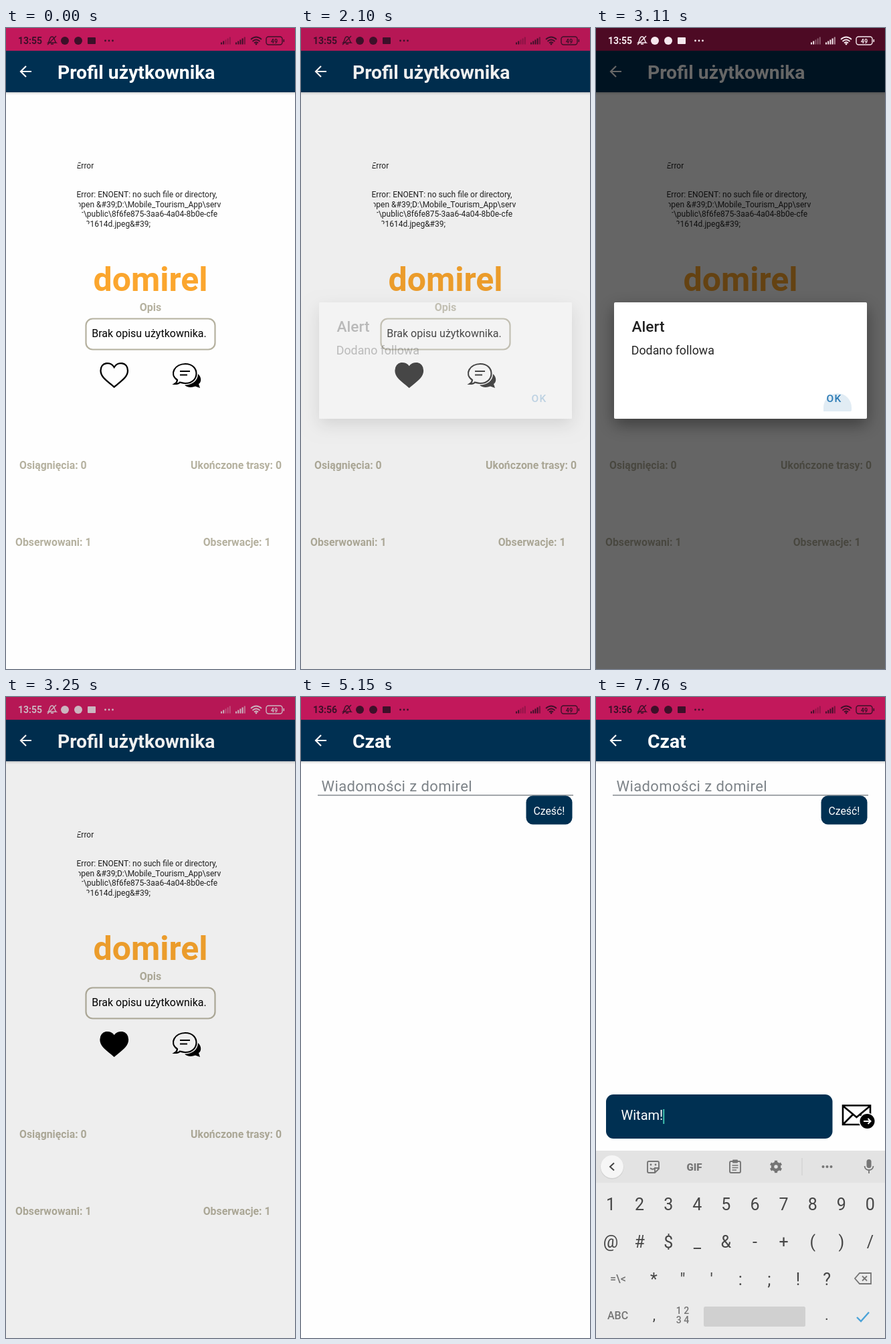
Animation of 432x958 px, one loop 8000 ms. Source, as an HTML page with a canvas:

```html
<!DOCTYPE html>
<html lang="pl">
<head>
<meta charset="utf-8">
<title>Profil i czat</title>
<style>
html, body { margin: 0; width: 100%; height: 100%; overflow: hidden; background: #fff; }
canvas { display: block; width: 432px; height: 958px; }
</style>
</head>
<body>
<canvas id="stage"></canvas>
<script>
const W = 432, H = 958, LOOP = 8000, KEYBOARD = 280;
const NAVY = '#003052', PINK = '#c2185b', ORANGE = '#fba62e', BEIGE = '#b5b19f', GREY = '#757575', KEY = '#464646';
const USER = 'domirel';

const canvas = document.getElementById('stage'), c = canvas.getContext('2d');
const dpr = window.devicePixelRatio || 1;
canvas.width = W * dpr;
canvas.height = H * dpr;

const ramp = (t, from, to) => Math.min(1, Math.max(0, (t - from) / (to - from)));
const mix = (a, b, k) => `rgb(${a.map((v, i) => Math.round(v + (b[i] - v) * k))})`;

function text(s, x, y, size, color, weight = 400, align = 'left', spacing = 0) {
  c.font = `${weight} ${size}px Roboto, sans-serif`;
  c.letterSpacing = spacing + 'px';
  c.textAlign = align;
  c.fillStyle = color;
  c.fillText(s, x, y);
}
const center = (s, x, y, size, color, weight) => text(s, x, y, size, color, weight, 'center');

function rect(x, y, w, h, color, r = 0) {
  c.fillStyle = color;
  c.beginPath();
  c.roundRect(x, y, w, h, r);
  c.fill();
}
function frame(x, y, w, h, color, r, line) {
  c.strokeStyle = color;
  c.lineWidth = line;
  c.beginPath();
  c.roundRect(x, y, w, h, r);
  c.stroke();
}
function disc(x, y, r, color) {
  c.fillStyle = color;
  c.beginPath();
  c.arc(x, y, r, 0, 7);
  c.fill();
}
function ring(x, y, r, color, line) {
  c.strokeStyle = color;
  c.lineWidth = line;
  c.beginPath();
  c.arc(x, y, r, 0, 7);
  c.stroke();
}
const fill = (d, color) => { c.fillStyle = color; c.fill(new Path2D(d)); };
function stroke(d, color, line = 2) {
  c.strokeStyle = color;
  c.lineWidth = line;
  c.stroke(new Path2D(d));
}
function layer(draw) {
  c.save();
  draw();
  c.restore();
}

function statusIcons(t) {
  const light = ramp(t, 2150, 2350) - ramp(t, 3200, 3420);
  const ink = mix([61, 16, 41], [246, 232, 238], light);
  text(t < 4000 ? '13:55' : '13:56', 18, 24, 14, ink, 700);
  stroke('M63 22C66 20 64 13 69 13C73 13 72 20 75 22ZM67 24H71M62 25L75 12', ink, 1.4);
  disc(88, 19, 6, ink);
  disc(108, 19, 6, ink);
  rect(122, 14, 12, 10, ink, 1);
  for (let i = 0; i < 3; i++) disc(148.5 + i * 5.5, 19, 1.4, ink);
  for (let i = 0; i < 5; i++) {
    const h = 3 + i * 2;
    c.globalAlpha = i < 2 ? 1 : 0.35;
    rect(321 + i * 3.2, 24.5 - h, 2, h, ink);
    c.globalAlpha = i < 4 ? 1 : 0.6;
    rect(343 + i * 3.2, 24.5 - h, 2, h, ink);
  }
  c.globalAlpha = 1;
  stroke('M366 17Q374 10 382 17M368.500 20Q374 15 379.500 20M371 22.500Q374 20 377 22.500', ink, 1.7);
  disc(374, 24, 1.4, ink);
  frame(389, 13, 24, 12, ink, 3.5, 1.4);
  rect(414.5, 17, 1.6, 4, ink);
  center('49', 401, 22.5, 9, ink, 700);
}

function header(title) {
  const g = c.createLinearGradient(0, 96, 0, 100);
  g.addColorStop(0, 'rgba(0,0,0,.16)');
  g.addColorStop(1, 'rgba(0,0,0,0)');
  rect(0, 96, W, 4, g);
  rect(0, 34, W, 62, NAVY);
  stroke('M38 65H22M30 57L22 65L30 73', '#fff', 2.2);
  text(title, 77, 75.5, 28.3, '#fff', 700);
}

function avatarError() {
  c.beginPath();
  c.arc(216, 231, 112, 0, 7);
  c.clip();
  const lines = ['Error: ENOENT: no such file or directory,', 'open &#39;D:\\Mobile_Tourism_App\\serv',
    'er\\public\\8f6fe875-3aa6-4a04-8b0e-cfe', 'a021614d.jpeg&#39;'];
  text('Error', 105.5, 210, 12, '#222');
  lines.forEach((s, i) => text(s, 105.5, 253 + i * 14.7, 12, '#222'));
}

function profile(t) {
  rect(0, 34, W, H, '#fefefe');
  header('Profil użytkownika');
  layer(avatarError);
  center(USER, 216, 393, 50, ORANGE, 700);
  center('Opis', 216, 423, 16, BEIGE, 700);
  frame(119.5, 434.5, 193, 46, BEIGE, 10, 2.2);
  text('Brak opisu użytkownika.', 128.2, 461.5, 16, '#000');

  const heart = 'M161.700 536.500C149 526 141.500 521 141.500 512C141.500 499 156.500 498 161.700 507C167 498 182 499 182 512C182 521 174.500 526 161.700 536.500Z';
  if (t >= 1960) fill(heart, '#000');
  stroke(heart, '#000', 2.3);

  stroke('M256 526C243 517 253 502 268 502C290 502 290 531 268 531C264 531 262 530 260 529.500C258 532 255 532 252 532C255 530 256 528 256 526ZM260 513H275M260 518.500H271', '#000', 2.2);
  fill('M287 517C293 522 292 530 288 532L290 538L283 535.500C277 538 270 537 267 533.500C278 534 287 527 287 517Z', '#000');

  text('Osiągnięcia: 0', 20, 658.5, 15.8, BEIGE, 700);
  text('Ukończone trasy: 0', 412, 658.5, 15.8, BEIGE, 700, 'right');
  text('Obserwowani: 1', 14, 773.5, 15.8, BEIGE, 700);
  text('Obserwacje: 1', 395.5, 773.5, 15.8, BEIGE, 700, 'right');
}

// The shadow stays outside the panel so that it does not show through while fading.
function panelShadow() {
  c.clip(new Path2D(`M0 0H${W}V${H}H0ZM27 410H405V584H27Z`), 'evenodd');
  c.shadowColor = 'rgba(0,0,0,.4)';
  c.shadowBlur = 24 * dpr;
  c.shadowOffsetY = 9 * dpr;
  rect(27, 410, 378, 174, '#fff', 2);
}

function alertBox(t, alpha) {
  c.globalAlpha = alpha;
  layer(panelShadow);
  rect(27, 410, 378, 174, '#fff', 2);
  text('Alert', 53.5, 454, 22.6, '#212121', 500);
  text('Dodano followa', 52.8, 488, 17.8, '#262626');
  if (t >= 3110) fill('M340 573V567A21 21 0 0 1 382 567V571Q382 573 380 573Z', '#e1ecf4');
  text('OK', 344.5, 559, 15.5, '#2a7ab5', 500, 'left', 1.4);
}

function chat(t) {
  rect(0, 34, W, H, '#fefefe');
  header('Czat');
  text('Wiadomości z ' + USER, 30.5, 141, 22, '#7d8388', 400, 'left', 0.4);
  rect(25, 146, 382, 1.6, '#858b90');
  if (t >= 4620) {
    rect(336.5, 147.5, 69, 43, NAVY, 10);
    text('Cześć!', 347.5, 176, 15.8, '#fff');
  }
  if (t < 5080 || t >= 5200) layer(() => composer(t));
}

// Typed text: [time, text, suggestions]
const TYPING = [
  [5300, '', ''],
  [5820, 'W', 'W We Wszystko'],
  [6030, 'Wi', 'Wi Więc Więcej'],
  [6240, 'Wit', 'Wit Witam Witaj'],
  [6400, 'Wita', 'Wita Witam Witaj'],
  [6560, 'Witam', 'Witam Witamy Witaj'],
  [7490, 'Witam!', '']
];
const typed = t => TYPING.findLast(k => t >= k[0]) || TYPING[0];

function composer(t) {
  if (t < 5080) c.translate(0, KEYBOARD);
  rect(15, 594, 338.5, 66, NAVY, 11);
  const [since, word, hints] = typed(t);
  text(word, 37.5, 632, 20, '#fff');
  const w = c.measureText(word).width;
  if (hints) rect(38, 634.5, w - 1, 1.2, '#dfe6ec');
  if (t >= 5300 && (t - since) % 1000 < 600) rect(37.5 + w, 616, 2, 22, '#3fc1b0');

  stroke('M369 610.500H410V639H369ZM369 611L389.500 628L410 611M369 639L384 624M410 639L395 624', '#000', 2.6);
  disc(405.5, 634, 12.5, '#fefefe');
  disc(405.5, 634, 11, '#000');
  stroke('M400 634H410.500M406.500 630L410.500 634L406.500 638', '#fff', 2);
}

const row = (keys, x, y, size = 25) => [...keys].forEach((k, i) => center(k, x + i * 43.1, y, size, KEY));

function suggestionBar(hints) {
  rect(0, 678, W, 48, '#e3e3e3');
  disc(24, 703, 17.5, '#d2d2d2');
  disc(24, 702, 17, '#f6f6f6');
  stroke(hints ? 'M21 696.500L27 702L21 707.500' : 'M27 696.500L21 702L27 707.500', '#444');
  rect(404.5, 691, 7, 13, GREY, 3.5);
  stroke('M401.500 701C402 709 414 709 414.500 701M408 707V712', GREY, 1.8);
  if (hints) {
    hints.split(' ').forEach((s, i) => center(s, 100 + i * 114.5, 710, 19.8, '#555'));
    rect(154, 688, 1, 27, '#cdcdcd');
    rect(275, 688, 1, 27, '#cdcdcd');
    return;
  }
  stroke('M79 694H92Q94 694 94 696V705L88 711H79Q77 711 77 709V696Q77 694 79 694ZM94 704H88V711M81 704Q85 708 89 703', GREY, 1.9);
  disc(82, 699, 1.4, GREY);
  disc(89, 699, 1.4, GREY);
  center('GIF', 147, 707.5, 15, GREY, 900);
  frame(200, 694, 16, 17, GREY, 2, 1.9);
  rect(204, 691.5, 8, 5, GREY, 1);
  stroke('M203.500 700H212.500M203.500 703.500H212.500M203.500 707H210', GREY, 1.4);
  ring(269, 702, 5, GREY, 4.5);
  for (let i = 0; i < 6; i++) {
    const a = i * Math.PI / 3 + Math.PI / 6, x = Math.cos(a), y = Math.sin(a);
    stroke(`M${269 + x * 6} ${702 + y * 6}L${269 + x * 9.2} ${702 + y * 9.2}`, GREY, 4.2);
  }
  rect(307.5, 689, 1, 26, '#cdcdcd');
  for (let i = -1; i < 2; i++) disc(345.5 + i * 6, 702, 2, GREY);
}

function keyboard(t) {
  c.translate(0, KEYBOARD * (1 - ramp(t, 5190, 5430)) ** 2);
  rect(0, 678, W, KEYBOARD, '#ebebeb');
  const [, word, hints] = typed(t);
  suggestionBar(hints);

  const symbols = t >= 6960;
  if (symbols) {
    row('1234567890', 22, 767);
    row('@#$_&-+()/', 22, 823);
    row('*"\':;!?', 86.5, 879);
    center('=\\<', 33, 875, 16, GREY, 500);
    center('1 2', 129.5, 922, 14, GREY, 500);
    center('3 4', 129.5, 936, 14, GREY, 500);
  } else {
    const letters = s => word ? s : s.toUpperCase();
    row(letters('qwertyuiop'), 22, 765);
    [...'1234567890'].forEach((d, i) => center(d, 35 + i * 43.1, 747, 11, '#858585', 500));
    row(letters('asdfghjkl'), 43.5, 821);
    row(letters('zxcvbnm'), 86.5, 877);
    const shift = 'M32.500 878V861M24.500 869L32.500 861L40.500 869';
    stroke(shift, word ? GREY : KEY, word ? 1.8 : 2.6);
    ring(129, 924, 10, GREY, 1.9);
    disc(125.5, 921, 1.5, GREY);
    disc(132.5, 921, 1.5, GREY);
    stroke('M124 926.500Q129 932 134 926.500', GREY, 1.9);
  }
  stroke('M394 861H411V877H394L387 869ZM398 865.500L405 872.500M405 865.500L398 872.500', GREY, 1.8);
  center(symbols ? 'ABC' : '?123', 32.5, 930, 16, GREY, 500);
  center(',', 87, 931, 22, KEY);
  rect(161, 911, 152, 30, '#d0d0d0', 2.5);
  center('.', 345, 931, 22, KEY);
  stroke('M390 927L396 933L408 919.500', '#4ba3d8', 2.4);
}

function draw(t) {
  c.setTransform(dpr, 0, 0, dpr, 0, 0);
  rect(0, 0, W, 34, PINK);
  const enter = ramp(t, 4170, 4520);
  if (enter < 1) profile(t);
  if (enter > 0) layer(() => {
    const rest = (1 - enter) ** 3;
    c.beginPath();
    c.rect(0, 34, W, H);
    c.clip();
    c.globalAlpha = 1 - rest;
    c.translate(0, 75 * rest);
    chat(t);
  });
  if (t >= 5190) layer(() => keyboard(t));

  const open = ramp(t, 2074, 2340), close = ramp(t, 3130, 3265);
  if (open > close) {
    rect(0, 0, W, H, `rgba(0,0,0,${0.6 * (open - close)})`);
    layer(() => alertBox(t, (1 - (1 - open) ** 3) * (1 - close) ** 3));
  }
  statusIcons(t);
}

function tick() {
  draw(performance.now() % LOOP);
  requestAnimationFrame(tick);
}
tick();
</script>
</body>
</html>
```
